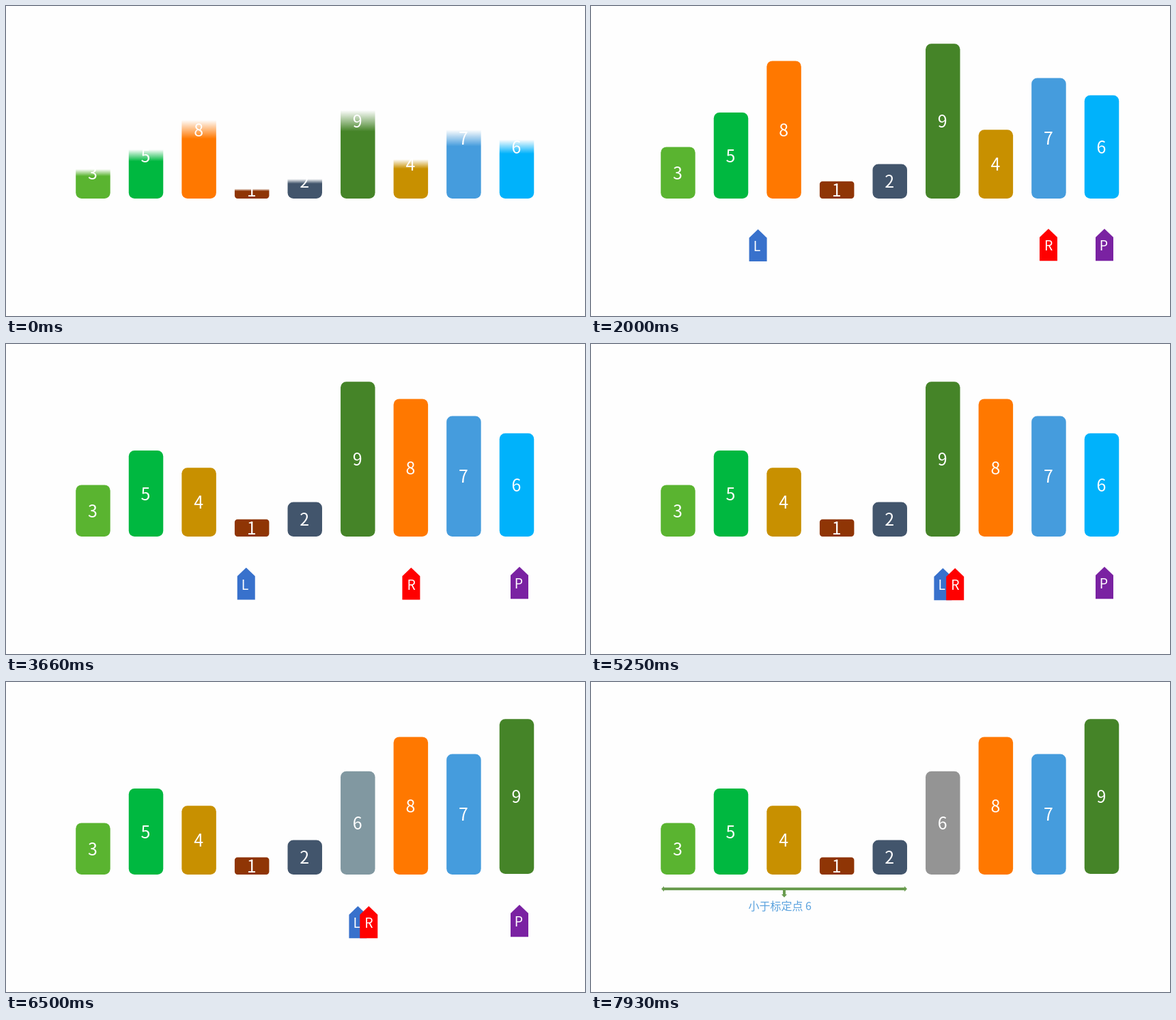
These frames come from a looping animation (848 px wide and 454 px high, 7.99 s). An HTML page:

```html
<!DOCTYPE html>
<html lang="zh">
<head>
<meta charset="utf-8">
<title>Partition step</title>
<style>
  html, body { margin: 0; width: 100%; height: 100%; overflow: hidden; background: #fefefe; }
  svg { display: block; width: 100vw; height: 100vh; }
  text { font-family: "Noto Sans CJK SC", "Noto Sans CJK", "Noto Sans", sans-serif; fill: #fff; }
  .digit { font-size: 25px; text-anchor: middle; }
  .letter { font-size: 19.5px; text-anchor: middle; }
  .note { font-size: 16px; fill: #5aa2de; }
</style>
</head>
<body>
<svg id="stage" viewBox="0 0 848 454">
  <defs id="defs"></defs>
  <g id="bars"></g>
  <g id="tags"></g>
  <g id="result">
    <path fill="#6a9c50" d="M103 303l4-4v2h352v-2l4 4l-4 4v-2H285v6h2l-4 4.5l-4-4.5h2v-6H107v2z"/>
    <text class="note" x="230.5" y="334">小于标定点 6</text>
  </g>
</svg>
<script>
const LOOP = 7990;
const SOFT = 0.137;
const BASE = 282, WIDTH = 50.5, UNIT = 25.2;
const NS = "http://www.w3.org/2000/svg";
const $ = id => document.getElementById(id);

function add(parent, tag, attrs, text) {
  const el = document.createElementNS(NS, tag);
  set(el, attrs);
  if (text) el.textContent = text;
  parent.appendChild(el);
  return el;
}
function set(el, attrs) {
  for (const k in attrs) el.setAttribute(k, attrs[k]);
}

const clamp = v => Math.min(1, Math.max(0, v));
const span = (t, from, length = 500) => clamp((t - from) / length);
const ease = u => u < 0.5 ? 2 * u * u : 1 - 2 * (1 - u) ** 2;
const mix = (a, b, u) => a + (b - a) * u;
const slot = i => 102.2 + 77.57 * i;

// Soft upward wipe, in bounding-box units
function makeWipe(id) {
  const grad = add($("defs"), "linearGradient", { id: id + "Grad", gradientUnits: "userSpaceOnUse", x1: 0, x2: 0 });
  add(grad, "stop", { offset: 0, "stop-color": "#fff" });
  add(grad, "stop", { offset: 1, "stop-color": "#000" });
  const mask = add($("defs"), "mask", { id, maskContentUnits: "objectBoundingBox" });
  add(mask, "rect", { x: -0.2, y: -0.2, width: 1.4, height: 1.4, fill: `url(#${id}Grad)` });
  return u => {
    const front = u * (1 + SOFT);
    set(grad, { y1: 1 - front + SOFT, y2: 1 - front });
  };
}
const wipeBars = makeWipe("wipeBars");
const wipePivot = makeWipe("wipePivot");
const wipeEnds = makeWipe("wipeEnds");

const colors = {
  1: "#8f3505", 2: "#42556c", 3: "#5ab430", 4: "#c89000", 5: "#00b840",
  6: "#00b2fb", 7: "#459cdd", 8: "#ff7800", 9: "#458428"
};
const values = [3, 5, 8, 1, 2, 9, 4, 7, 6];
const bars = {};
for (const v of [8, 4, 3, 5, 1, 2, 9, 7, 6]) {
  const h = UNIT * v;
  const g = add($("bars"), "g", {});
  const rect = add(g, "rect", {
    y: BASE - h, width: WIDTH, height: h, rx: Math.min(8.4, h / 6),
    fill: colors[v], mask: "url(#wipeBars)"
  });
  add(g, "text", { class: "digit", x: WIDTH / 2 - 0.5, y: BASE - h / 2 + 9.6 }, String(v));
  bars[v] = { g, rect };
}

function makeTag(letter, color, mask, shift) {
  const g = add($("tags"), "g", {});
  add(g, "path", { d: "M0 12.5L13 0L26 12.5V47H0z", fill: color, mask: `url(#${mask})` });
  add(g, "text", { class: "letter", x: 13 + shift, y: 32 }, letter);
  return g;
}
const left = makeTag("L", "#3871cc", "wipeEnds", -1.6);
const right = makeTag("R", "#ff0000", "wipeEnds", 0.2);
const pivot = makeTag("P", "#7a22a2", "wipePivot", -1);

// Each stop: start time, then the x and y reached 500 ms later
const leftPath = [[0, 115, 326.4], [1250, 192.4, 326.8], [1750, 270.2, 327.4],
  [3280, 347.5, 327.6], [3800, 425, 327.8], [4300, 502.4, 328.2]];
const rightPath = [[0, 657, 326.2], [2256, 580.4, 327.5], [4813, 518.3, 328.2]];

function follow(path, t) {
  let [, x, y] = path[0];
  for (const [start, nx, ny] of path.slice(1)) {
    const u = ease(span(t, start));
    x = mix(x, nx, u);
    y = mix(y, ny, u);
  }
  return [x, y];
}
const place = (el, x, y) => el.setAttribute("transform", `translate(${x} ${y})`);

function draw(t) {
  wipeBars(span(t, -250));
  wipePivot(span(t, 250));
  wipeEnds(span(t, 750));

  const swap1 = ease(span(t, 2764));
  const swap2 = ease(span(t, 5320));
  const moves = { 8: [6, swap1, 0], 4: [2, swap1, 0], 9: [8, swap2, -1], 6: [5, swap2, 0] };
  values.forEach((v, i) => {
    const [to, u, dy] = moves[v] || [i, 0, 0];
    place(bars[v].g, mix(slot(i), slot(to), u), dy * u);
  });

  const grey = span(t, 5840, 760);
  const rgb = [0, 178, 251].map(c => Math.round(mix(c, 148, grey)));
  bars[6].rect.setAttribute("fill", `rgb(${rgb})`);

  place(left, ...follow(leftPath, t));
  place(right, ...follow(rightPath, t));
  place(pivot, 739, 326.2);
  left.style.visibility = right.style.visibility = t < 750 ? "hidden" : "visible";
  pivot.style.visibility = t < 250 ? "hidden" : "visible";
  $("tags").style.opacity = 1 - span(t, 6600);

  const rise = span(t, 7110, 750);
  place($("result"), 0, 45 * (1 - rise) ** 2);
  $("result").style.opacity = rise;
}

const begin = performance.now();
function tick() {
  draw((performance.now() - begin) % LOOP);
  requestAnimationFrame(tick);
}
tick();
</script>
</body>
</html>
```
